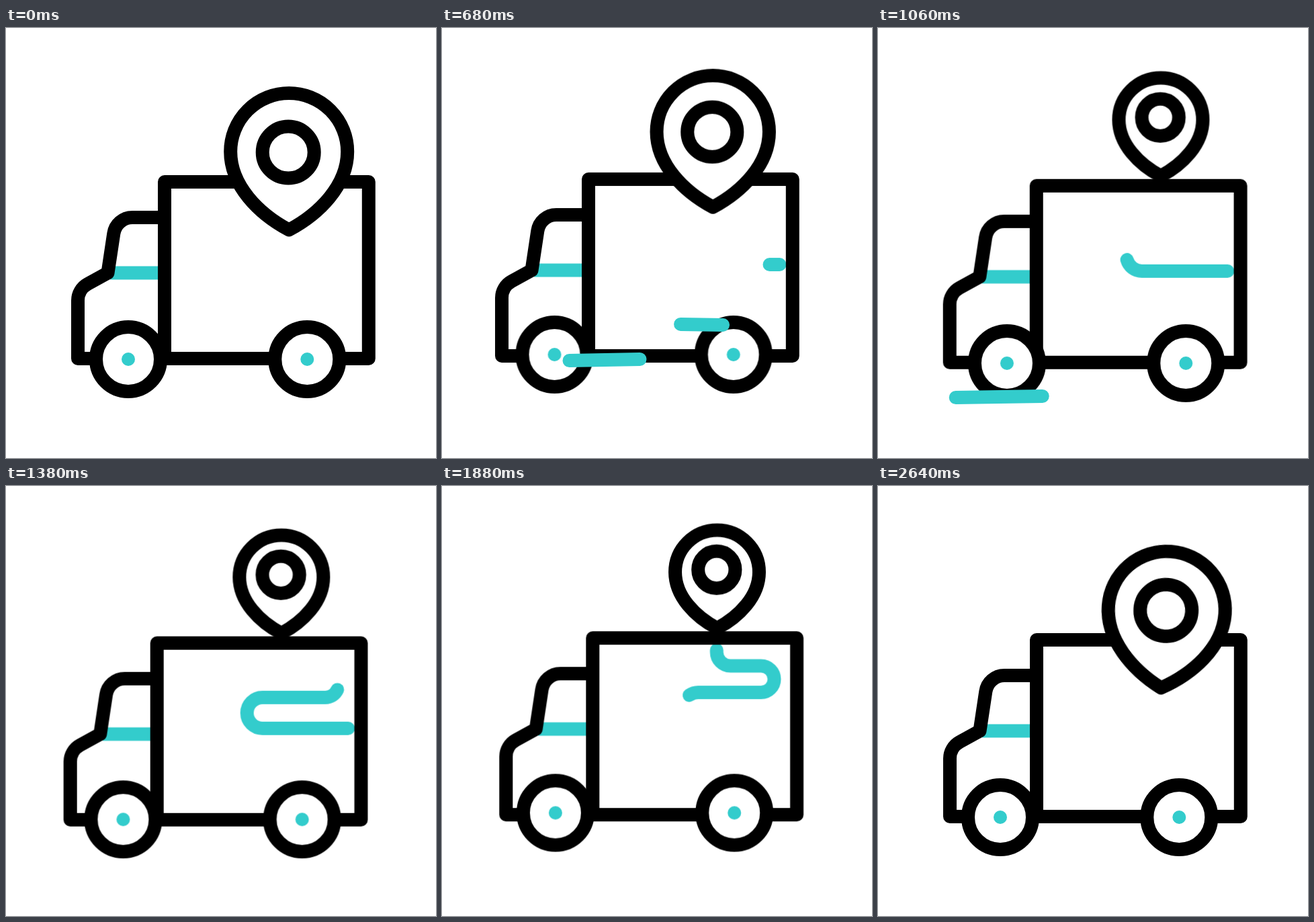
An HTML page without scripts for the animation above (2.66 s loop, 640 px wide and 640 px high).

```html
<!DOCTYPE html>
<html lang="en">
<head>
<meta charset="utf-8">
<title>Delivery truck</title>
<style>
  html, body { margin: 0; width: 100%; height: 100%; overflow: hidden; background: #fff; }
  svg { display: block; width: 100%; height: 100%; }

  .ink, .teal { stroke-width: 20; stroke-linecap: round; stroke-linejoin: round; }
  .ink { stroke: #000; fill: none; }
  .teal { stroke: #3cc; fill: none; }
  .paper { fill: #fff; }
  .hub { fill: #3cc; }
  .pin * { vector-effect: non-scaling-stroke; }

  .truck, .wheels, .pin, .ring {
    animation-duration: 2.66s;
    animation-iteration-count: infinite;
    animation-timing-function: cubic-bezier(.37, 0, .63, 1);
  }
  .truck { animation-name: truck-sway, truck-bounce; }
  .wheels { animation-name: wheel-sway, wheel-bounce; }
  .pin { animation-name: pin-lift, pin-size, pin-swing; }
  .ring { animation-name: ring-lift; }

  @keyframes truck-sway {
    0%, 1.5%, 80.8%, 100% { translate: 0; }
    19.9% { translate: -21.5px; }
    41.4% { translate: 0; }
    61.7% { translate: -21.5px; }
  }
  @keyframes truck-bounce {
    0%, 1.5%, 82.7%, 100% { transform: translateY(0); }
    7.5% { transform: translateY(7.5px); }
    24.7% { transform: translateY(-4px); }
    45.1% { transform: translateY(7.5px); }
    65.4% { transform: translateY(-3.5px); }
  }
  @keyframes wheel-sway {
    0%, 1.5%, 82.7%, 100% { translate: 0; }
    21.1% { translate: -18px; }
    40.6% { translate: 10px; }
    61.7% { translate: -21.5px; }
  }
  @keyframes wheel-bounce {
    0%, 1.5%, 83.4%, 100% { transform: translateY(0); }
    7.5% { transform: translateY(8px); }
    25.2% { transform: translateY(-7px); }
    44.7% { transform: translateY(8px); }
    64.7% { transform: translateY(-8.5px); }
  }
  @keyframes pin-lift {
    0%, 16.5%, 88.7%, 100% { translate: 0 0; }
    39.1%, 77.4% { translate: 0 -86px; }
  }
  @keyframes pin-size {
    0%, 21.8%, 86.5%, 100% { scale: 1; }
    37.6%, 75.9% { scale: .718; }
  }
  @keyframes pin-swing {
    0%, 79.7% { rotate: 0deg; }
    87.6% { rotate: -5deg; }
    99.2%, 100% { rotate: 4.2deg; }
  }
  @keyframes ring-lift {
    0%, 21.8%, 86.5%, 100% { translate: 0 0; }
    37.6%, 75.9% { translate: 0 -6px; }
  }

  .route {
    stroke-dasharray: 436px 999px;
    animation: route 2.66s linear infinite;
  }
  @keyframes route {
    0%, 22.6% { stroke-dashoffset: 437px; }
    25.6% { stroke-dashoffset: 421px; }
    39.8% { stroke-dashoffset: 280px; }
    51.9% { stroke-dashoffset: 121px; }
    62.4% { stroke-dashoffset: 0px; animation-timing-function: cubic-bezier(.37, 0, .63, 1); }
    80.8%, 100% { stroke-dashoffset: -437px; }
  }

  /* a dash that runs along its path once per loop, starting at --at */
  .streak {
    stroke-dasharray: var(--dash) 999px;
    animation: streak 2.66s linear var(--at) infinite backwards;
  }
  @keyframes streak {
    from { stroke-dashoffset: calc(var(--dash) + 1px); }
    12.8%, to { stroke-dashoffset: calc(-1px - var(--len)); }
  }
  .ground { --dash: 129px; --len: 285px; }
</style>
</head>
<body>
<svg viewBox="0 0 640 640">
  <g class="truck">
    <path class="teal" style="stroke-linecap: butt" d="M155 364.5H236"/>
    <path class="teal route" d="M520.5 356H393a23 23 0 0 1 0-46H486.5a19.75 19.75 0 0 0 0-39.5H441a20.5 20.5 0 0 1-20.5-20.5V247"/>
    <path class="ink" d="M236 229H539.8V492H236ZM236 282H188a28 28 0 0 0-27.7 24L151.5 364.5 121.5 381a28 28 0 0 0-14.5 24.5V492H236"/>
  </g>

  <g class="wheels">
    <g id="wheel">
      <circle class="ink paper" cx="182" cy="493" r="48"/>
      <circle class="hub" cx="182" cy="493" r="10"/>
    </g>
    <use href="#wheel" x="266.3"/>
  </g>

  <g class="truck">
    <g transform="translate(421.2 300.5)">
      <g class="pin">
        <path class="ink paper" d="M0 0C-45-24-87-66-87-116.5a87 87 0 0 1 174 0C87-66 45-24 0 0Z"/>
        <circle class="ink ring" cx="-1" cy="-115.5" r="38.5"/>
      </g>
    </g>
  </g>

  <g class="teal">
    <path class="streak ground" style="--at: .2s" d="M115 550l285-4.4"/>
    <path class="streak ground" style="--at: .954s" d="M115 550l285-4.4"/>
    <path class="streak" style="--dash: 105px; --len: 300px; --at: .53s" d="M115 496.4l300-5.7"/>
    <path class="streak" style="--dash: 63px; --len: 200px; --at: .528s" d="M300 440l200 3.2"/>

    <path class="streak" style="--dash: 24px; --len: 34px; --at: 2.19s" d="M84 395l-22-26"/>
    <path class="streak" style="--dash: 26px; --len: 38px; --at: 2.114s" d="M77 439l-38-3.5"/>
    <path class="streak" style="--dash: 22px; --len: 30px; --at: 2.187s" d="M75 483l-25 16"/>
  </g>
</svg>
</body>
</html>
```
